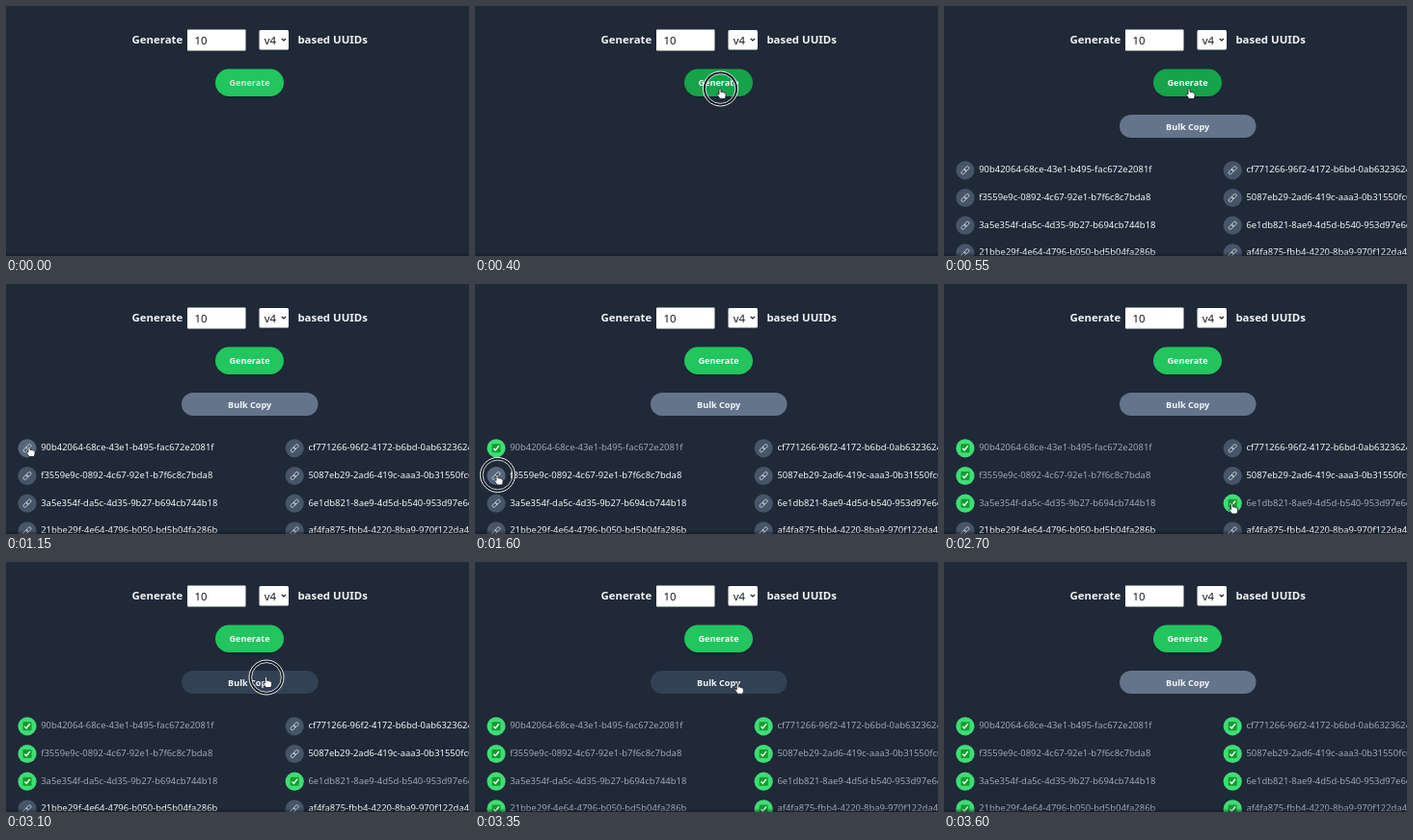
An HTML page that plays this animation: 480x260 px, repeating every 3700 ms.

```html
<!DOCTYPE html>
<html lang="en">
<head>
<meta charset="utf-8">
<title>UUID generator</title>
<style>
html, body { margin: 0; width: 100%; height: 100%; overflow: hidden; background: #1f2937; }
svg { display: block; width: 480px; height: 260px; font-family: "Noto Sans", "Open Sans", sans-serif; }
.head { font-size: 11.4px; font-weight: 700; fill: #f3f5f8; }
.field { font-size: 11.4px; fill: #15191f; }
.btn { font-size: 9.15px; font-weight: 700; fill: #f4f7f9; text-anchor: middle; }
.id { font-size: 9.45px; }
</style>
</head>
<body>
<svg viewBox="0 0 480 260">
  <defs>
    <linearGradient id="edge" x2="0" y2="1">
      <stop stop-color="#10151d" stop-opacity="0"/>
      <stop offset="1" stop-color="#10151d" stop-opacity=".5"/>
    </linearGradient>
    <g id="link" fill="none" stroke="#d3d8df" stroke-width=".85">
      <g transform="rotate(-45)">
        <rect x="-5" y="-1.6" width="5.6" height="3.2" rx="1.6"/>
        <rect x="-.6" y="-1.6" width="5.6" height="3.2" rx="1.6"/>
      </g>
    </g>
    <g id="tick">
      <rect x="-4.5" y="-4.5" width="9" height="9" rx="1.3" fill="#0f9d2c"/>
      <path d="M-2.7 .2L-.9 2.2L2.8-2.5" fill="none" stroke="#fff" stroke-width="1.4"/>
    </g>
  </defs>
  <rect width="480" height="260" fill="#1f2937"/>
  <text class="head" x="130.5" y="39.4">Generate</text>
  <rect x="188" y="24.5" width="60.5" height="22" rx="1" fill="#fff"/>
  <text class="field" x="195.6" y="39.6">10</text>
  <rect x="262.5" y="25" width="30.5" height="20.5" rx="1.5" fill="#fff"/>
  <text class="field" x="267.8" y="39.6">v4</text>
  <path d="M285.7 33.8l2.2 2.2l2.2-2.2" fill="none" stroke="#15191f" stroke-width="1.2"/>
  <text class="head" x="302.4" y="39.4">based UUIDs</text>

  <rect x="217" y="66.5" width="71" height="29" rx="14.5" fill="#0d1420" opacity=".4"/>
  <rect id="gen" x="217" y="65.5" width="71" height="28.5" rx="14.25"/>
  <text id="genText" class="btn" x="252.5" y="83.2">Generate</text>

  <g id="list">
    <rect id="bulk" x="182" y="113" width="141.5" height="24" rx="12"/>
    <text class="btn" x="252.7" y="128.8">Bulk Copy</text>
    <g id="rows"></g>
  </g>
  <rect y="256" width="480" height="4" fill="url(#edge)"/>

  <g id="ring" fill="none">
    <circle r="16.7" stroke="#10151d" stroke-width="2.4"/>
    <circle r="18" stroke="#f4f6f8" stroke-width="1"/>
    <circle r="15.4" stroke="#e3e7ec" stroke-width=".9"/>
  </g>
  <path id="arrow" d="M0 0V10L2.3 7.9L3.8 11.2L5.3 10.5L3.9 7.3H7Z" fill="#101318" stroke="#fff" stroke-width=".8"/>
  <path id="hand" d="M-1 .8Q0-.6 1 .8V4Q2.2 3.2 2.8 4.3Q4 3.7 4.5 4.8Q6 4.5 6 6V8Q6 9.4 5 11H0Q-1 9.2-3.2 6.6Q-3.2 5-1 6.5Z" fill="#fff" stroke="#14181e" stroke-width=".8" stroke-linejoin="round"/>
</svg>
<script>
const LOOP = 3700, STEP = 50;
const $ = id => document.getElementById(id);
const NEVER = 9999, ALL = 3200;

// Left and right id with the time each one is copied
const data = [
  ["90b42064-68ce-43e1-b495-fac672e2081f", 1350, "cf771266-96f2-4172-b6bd-0ab6323624e1", NEVER],
  ["f3559e9c-0892-4c67-92e1-b7f6c8c7bda8", 1650, "5087eb29-2ad6-419c-aaa3-0b31550fc6d2", NEVER],
  ["3a5e354f-da5c-4d35-9b27-b694cb744b18", 1900, "6e1db821-8ae9-4d5d-b540-953d97e6e07a", 2550],
  ["21bbe29f-4e64-4796-b050-bd5b04fa286b", NEVER, "af4fa875-fbb4-4220-8ba9-970f122da4c3", NEVER]
];

// Pointer stops: time, x, y
const stops = [
  [0, 335, 275], [50, 330, 266], [300, 254, 85.5], [600, 254, 85.5],
  [750, 232, 124], [920, 90, 185], [1080, 24, 168.5], [1400, 24, 168.5],
  [1520, 23, 198], [1700, 23, 198], [1800, 24, 227], [1920, 24, 227],
  [2180, 349, 189], [2250, 349, 189], [2420, 298.5, 228], [2780, 298.5, 228],
  [2980, 269.5, 119.5], [3320, 269.5, 119.5], [3560, 335, 275], [LOOP, 335, 275]
];
const presses = [[350, 450], [1250, 1400], [1550, 1700], [2450, 2600], [3050, 3200]];

const clamp = v => Math.max(0, Math.min(1, v));
const ease = v => v * v * (3 - 2 * v);

function pointer(t) {
  t = Math.max(0, t);
  const i = Math.max(1, stops.findIndex(s => s[0] >= t));
  const [t0, x0, y0] = stops[i - 1], [t1, x1, y1] = stops[i];
  const k = ease(clamp((t - t0) / (t1 - t0)));
  return [x0 + (x1 - x0) * k, y0 + (y1 - y0) * k];
}

function mix(a, b, k) {
  return `rgb(${a.map((v, i) => Math.round(v + (b[i] - v) * k))})`;
}

const inBox = (x, y, w, h) => p => p[0] > x && p[0] < x + w && p[1] > y && p[1] < y + h;
const onGen = inBox(217, 65, 71, 29);
const onBulk = inBox(182, 113, 141, 24);

// Share of the last 100 ms spent inside an area gives a soft hover
function hover(test, t) {
  let n = 0;
  for (let k = 0; k < 6; k++) n += test(pointer(t - k * 20));
  return n / 6;
}

function add(parent, tag, attrs, text = "") {
  const el = document.createElementNS("http://www.w3.org/2000/svg", tag);
  for (const key in attrs) el.setAttribute(key, attrs[key]);
  el.textContent = text;
  return parent.appendChild(el);
}

function makeItem(x, y, id, time) {
  const g = add($("rows"), "g", { transform: `translate(${x} ${y})` });
  return {
    time: Math.min(time, ALL),
    over: p => Math.hypot(p[0] - x, p[1] - y) < 9.6,
    dot: add(g, "circle", { r: 9.6 }),
    link: add(g, "use", { href: "#link" }),
    tick: add(g, "use", { href: "#tick" }),
    text: add(g, "text", { class: "id", x: 14.2, y: 2.5 }, id)
  };
}

const items = data.flatMap(([a, ta, b, tb], i) => {
  const y = 170.8 + i * 28.7;
  return [makeItem(22, y, a, ta), makeItem(299.2, y, b, tb)];
});

const show = (el, on) => el.setAttribute("visibility", on ? "inherit" : "hidden");
const fill = (el, c) => el.setAttribute("fill", c);
const move = (el, x, y) => el.setAttribute("transform", `translate(${x} ${y})`);

function draw(t) {
  const p = pointer(t), listed = t >= 450;
  fill($("gen"), mix([34, 197, 94], [22, 163, 74], hover(onGen, t)));
  $("genText").setAttribute("opacity", 0.78 + 0.22 * clamp(t / 250));
  fill($("bulk"), mix([100, 116, 139], [51, 65, 85], hover(onBulk, t)));
  show($("list"), listed);

  for (const it of items) {
    const k = clamp((t - it.time + STEP) / 100), done = k > 0;
    fill(it.dot, done ? mix([71, 85, 105], [64, 220, 118], k)
                      : mix([71, 85, 105], [88, 103, 125], hover(it.over, t)));
    fill(it.text, mix([244, 246, 248], [160, 167, 177], k));
    show(it.link, !done);
    show(it.tick, done);
  }

  const link = onGen(p) || listed && (onBulk(p) || items.some(it => it.over(p)));
  const out = t < 50 || t >= 3550;
  show($("hand"), link && !out);
  show($("arrow"), !link && !out);
  move($("hand"), ...p);
  move($("arrow"), ...p);
  move($("ring"), p[0] + 0.5, p[1] + 0.5);
  show($("ring"), presses.some(([a, b]) => t >= a && t < b));
}

const start = performance.now();
function frame() {
  const t = (performance.now() - start) % LOOP;
  draw(Math.floor(t / STEP) * STEP);
  requestAnimationFrame(frame);
}
frame();
</script>
</body>
</html>
```
